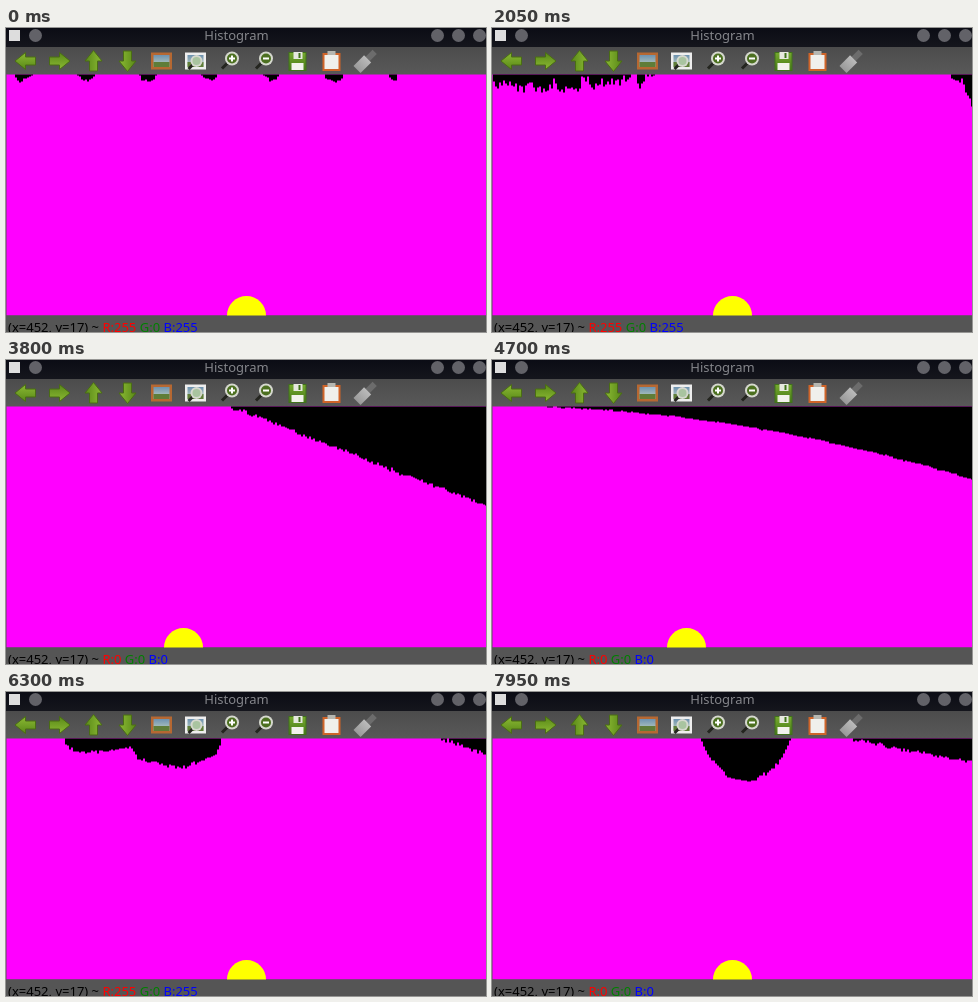
Recreate the animation shown at these times as an HTML page with a canvas. Size 480x304 px, loop 8000 ms.

```html
<!DOCTYPE html>
<html lang="en">
<head>
<meta charset="utf-8">
<title>Histogram</title>
<style>
html, body { margin: 0; width: 100%; height: 100%; overflow: hidden; background: #555; }
canvas { display: block; }
</style>
</head>
<body>
<canvas id="stage" width="480" height="304"></canvas>
<script>
const ctx = document.getElementById('stage').getContext('2d');
const WIDTH = 480, HEIGHT = 304, LOOP = 8000, STEP = 50;
const LEFT = .5, TOP = 46.5, BOTTOM = 287.5;
const PROBE = { x: 452, y: 17 };

// Building blocks of the gap, as depth below the plot's top edge.
const fallRight = (x, from, depth, power = 1) =>
  depth * Math.max(0, (x - from) / (WIDTH - from)) ** power;
const fallLeft = (x, from, depth, power = 1) =>
  depth * Math.max(0, (from - x) / from) ** power;
const hollow = (x, from, to, depth, power) =>
  x > from && x < to ? depth * Math.sin(Math.PI * (x - from) / (to - from)) ** power : 0;
const fringe = (x, period, depth) =>
  depth * Math.max(0, Math.cos(2 * Math.PI * (x / period - .27)) - .6) / .4;

const poses = [
  { t: 0, sun: 240, rough: 3, gap: x => x < 390 ? fringe(x, 62, 6) : 0 },
  { t: 2050, sun: 240, rough: 10, gap: x => fallLeft(x, 162, 13, .4) + fallRight(x, 458, 23, .8) },
  { t: 3800, sun: 177, rough: 3, gap: x => fallRight(x, 222, 100) },
  { t: 4700, sun: 194, rough: 1, gap: x => fallRight(x, 20, 73, 1.9) },
  { t: 6300, sun: 240, rough: 4, gap: x =>
    Math.max(hollow(x, 58, 128, 14, .3), hollow(x, 120, 215, 29, .5)) + fallRight(x, 432, 15) },
  { t: 7150, sun: 319, rough: 1, gap: x => x < 216 ? fallLeft(x, 236, 147) : 0 },
  { t: 7950, sun: 240, rough: 3, gap: x => hollow(x, 208, 298, 42, .7) + fallRight(x, 358, 23, .9) }
];

const mix = (a, b, k) => a + (b - a) * k;
const random = (x, seed) => {
  const v = Math.sin(x * 12.9898 + seed * 78.233) * 43758.5453;
  return v - Math.floor(v);
};

function rect(x, y, w, h, color) {
  ctx.fillStyle = color;
  ctx.fillRect(x, y, w, h);
}
function disc(x, y, r, color) {
  ctx.fillStyle = color;
  ctx.beginPath();
  ctx.arc(x, y, r, 0, Math.PI * 2);
  ctx.fill();
}
function shade(y1, y2, from, to) {
  const g = ctx.createLinearGradient(0, y1, 0, y2);
  g.addColorStop(0, from);
  g.addColorStop(1, to);
  return g;
}

// Toolbar icons, each drawn around its own centre.
function arrow(turns) {
  ctx.rotate(turns * Math.PI / 2);
  ctx.beginPath();
  ctx.moveTo(-10.5, 0);
  ctx.lineTo(0, -8.5);
  ctx.lineTo(0, -4);
  ctx.lineTo(10, -4);
  ctx.lineTo(10, 4);
  ctx.lineTo(0, 4);
  ctx.lineTo(0, 8.5);
  ctx.closePath();
  ctx.fillStyle = shade(-8, 8, '#8ab833', '#5a8a18');
  ctx.fill();
  ctx.strokeStyle = '#4a6d14';
  ctx.lineWidth = 1;
  ctx.stroke();
}
function picture(frame) {
  rect(-10.5, -8.5, 21, 17, frame);
  rect(-8, -6, 16, 12, shade(-6, 6, '#6d92b0', '#c3d2c0'));
  rect(-8, 1, 16, 5, '#5f7d38');
}
function lens(x, y, r, color) {
  ctx.strokeStyle = '#24251f';
  ctx.lineWidth = 3;
  ctx.beginPath();
  ctx.moveTo(x - r * .7, y + r * .7);
  ctx.lineTo(x - r * 2, y + r * 2);
  ctx.stroke();
  disc(x, y, r + 2, '#d5d8ce');
  disc(x, y, r, color);
}
function zoom(plus) {
  lens(2.5, -2.5, 5, '#4c7020');
  rect(-.5, -3.5, 6, 2, '#fff');
  if (plus) rect(1.5, -5.5, 2, 6, '#fff');
}
function disk() {
  rect(-9, -9, 18, 19, '#40721b');
  rect(-8, -8, 16, 17, shade(-8, 9, '#75a82e', '#477b18'));
  rect(-4, -9, 9, 7, '#e6e8df');
  rect(1, -8, 2, 5, '#40721b');
  rect(-6, 2, 12, 7, '#f2f2ed');
}
function clipboard() {
  rect(-9, -8, 18, 18, '#cf6429');
  rect(-7, -6, 14, 14, '#f0f0ec');
  rect(-4, -10, 8, 4, '#b6b7b1');
}
function brush() {
  ctx.rotate(Math.PI / 4);
  rect(-3, -13, 6, 11, '#6c6c6c');
  rect(-5, -3, 10, 15, shade(-3, 12, '#bbb', '#999'));
}

const icons = [
  () => arrow(0), () => arrow(2), () => arrow(1), () => arrow(3),
  () => picture('#b66832'),
  () => { picture('#eee'); lens(1, 0, 4, '#a9c4a0'); },
  () => zoom(true), () => zoom(false), disk, clipboard, brush
];

function drawWindow() {
  rect(0, 0, WIDTH, HEIGHT, '#555');
  rect(0, 0, WIDTH, 19, shade(0, 18, '#0b0c15', '#14151c'));
  rect(0, 19, WIDTH, 28, shade(19, 47, '#4c4c4c', '#595959'));
  rect(3, 2, 11, 11, '#ddd');
  for (const x of [29, 431, 452, 473]) disc(x + .5, 7.5, 6.5, '#626268');
  ctx.font = '13px "Noto Sans", sans-serif';
  ctx.textAlign = 'center';
  ctx.fillStyle = '#85868b';
  ctx.fillText('Histogram', 230.5, 12);
  icons.forEach((draw, i) => {
    ctx.save();
    ctx.translate(19.5 + i * 34, 33);
    draw();
    ctx.restore();
  });
}

function drawStatus(value) {
  rect(0, BOTTOM, WIDTH, HEIGHT - BOTTOM, '#555');
  ctx.textAlign = 'left';
  let x = 2;
  for (const [text, color] of [
    [`(x=${PROBE.x}, y=${PROBE.y}) ~ `, '#000'],
    [`R:${value} `, '#f00'], ['G:0 ', '#008000'], [`B:${value}`, '#00f']
  ]) {
    ctx.fillStyle = color;
    ctx.fillText(text, x, HEIGHT);
    x += ctx.measureText(text).width;
  }
}

function draw(time) {
  const step = Math.floor(time / STEP), t = step * STEP;
  const next = Math.max(1, poses.findIndex(p => p.t >= t));
  const a = poses[next - 1], b = poses[next];
  const k = (t - a.t) / (b.t - a.t);
  const depth = x => mix(a.gap(x), b.gap(x), k);
  const rough = mix(a.rough, b.rough, k);

  drawWindow();
  rect(LEFT, TOP, WIDTH, BOTTOM - TOP, '#f0f');
  for (let x = 1; x < WIDTH; x += 2) {
    const d = depth(x);
    const jitter = random(x, step) + random(Math.floor(x / 8), step) - 1;
    if (d > .5) rect(x, TOP, 2, Math.max(0, Math.round(d + jitter * rough)), '#000');
  }
  disc(mix(a.sun, b.sun, k) + .5, BOTTOM, 19.5, '#ff0');
  drawStatus(depth(PROBE.x) > PROBE.y ? 0 : 255);
}

function tick() {
  draw(performance.now() % LOOP);
  requestAnimationFrame(tick);
}
tick();
</script>
</body>
</html>
```
